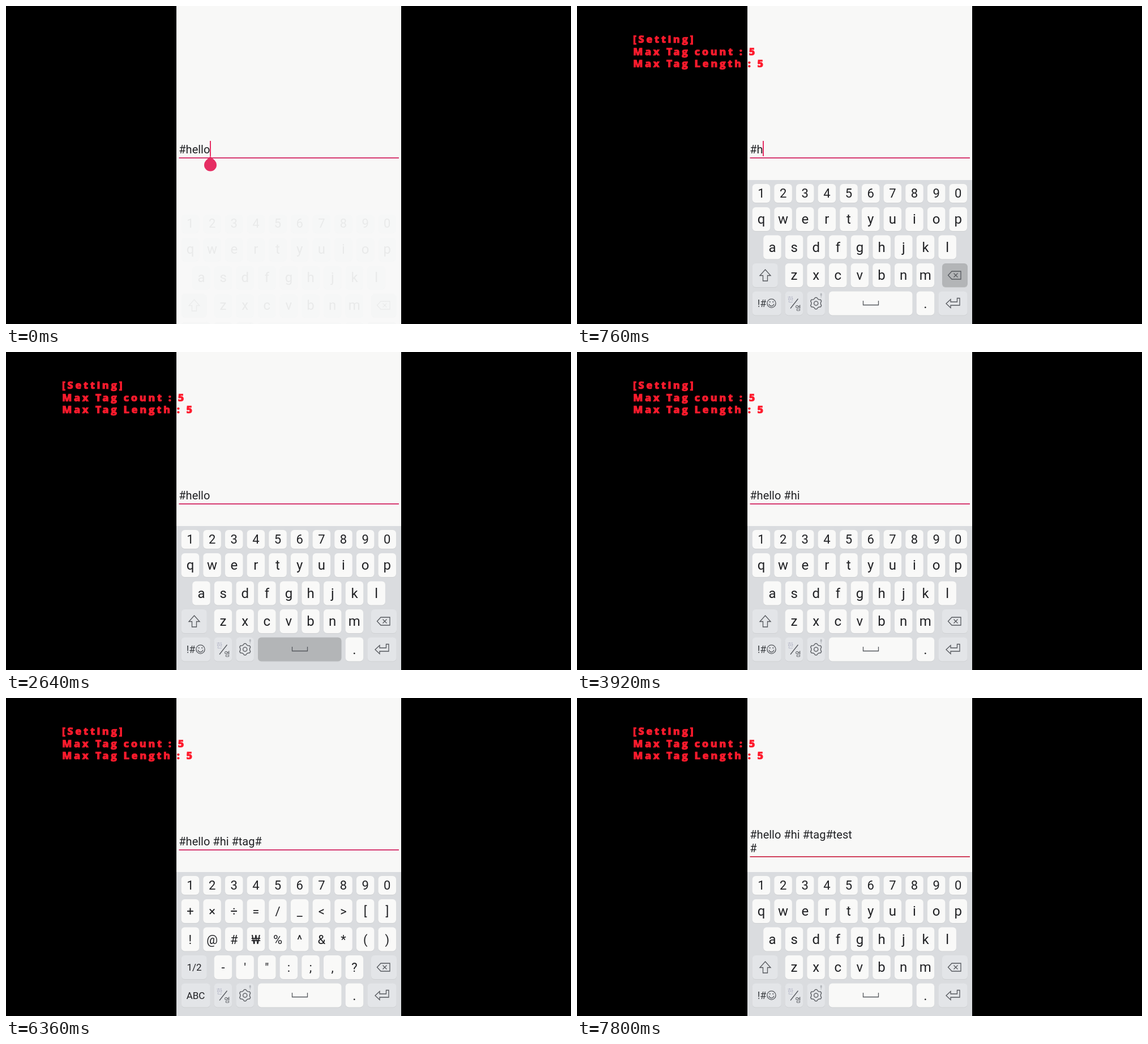
Recreate the animation shown at these times as an HTML page with a canvas. Size 998 by 561 pixels, loop 8000 ms.

```html
<!DOCTYPE html>
<html lang="en">
<head>
<meta charset="utf-8">
<title>Tag input</title>
<style>
  html, body { margin: 0; width: 100%; height: 100%; overflow: hidden; background: #000; }
  canvas { display: block; width: 998px; height: 561px; }
</style>
</head>
<body>
<canvas id="stage" width="998" height="561"></canvas>
<script>
const ctx = document.getElementById('stage').getContext('2d');
const LOOP = 8000, BLINK = 240;
const PAPER = '#f8f8f7', KEY = '#f9f9f8', PINK = '#e62e63', INK = '#202124', ICON = '#55585d';
const ROBOTO = 'Roboto, sans-serif';
const clamp = v => Math.max(0, Math.min(1, v));

// Key presses: [key, down, up, text added]
const presses = [
  ...[400, 520, 640, 760, 880].map(t => ['back', t, t + 80, '']),
  ['h', 1640, 1720, 'h'], ['e', 1800, 1880, 'e'], ['l', 1920, 2000, 'l'],
  ['l', 2040, 2120, 'l'], ['o', 2160, 2240, 'o'], ['space', 2640, 2720, ' #'],
  ['h', 3480, 3560, 'h'], ['i', 3600, 3680, 'i'], ['space', 4040, 4120, ' #'],
  ['t', 4600, 4680, 't'], ['a', 4740, 4820, 'a'], ['g', 4880, 4960, 'g'],
  ['mode', 5640, 5720, ''], ['#', 6080, 6120, '#'], ['mode', 6520, 6600, ''],
  ['t', 6840, 6920, 't'], ['e', 6960, 7040, 'e'], ['s', 7060, 7140, 's'],
  ['t', 7200, 7280, 't'], ['enter', 7520, 7560, '\n#']
];

// Key layouts
const PITCH = 38.65;
const row = (chars, x, y, h, size) => [...chars].map((id, i) =>
  ({ id, x: x + i * PITCH, y, w: 31.5, h, size, label: id }));
const special = (id, x, y, w) => ({ id, x, y, w, h: 42, gray: id !== 'space' });
const common = [
  ...row('1234567890', 309.7, 314, 33, 22),
  special('back', 645, 454, 45), special('mode', 309.7, 503.5, 51),
  special('lang', 367.7, 503.5, 31.5), special('gear', 406.4, 503.5, 31.5),
  special('space', 445, 503.5, 147.5), special('enter', 638.6, 503.5, 51),
  ...row('.', 599.7, 503.5, 42, 24), special('shift', 309.7, 454, 45)
];
const letters = [...common,
  ...row('qwertyuiop', 309.7, 355, 42, 24),
  ...row('asdfghjkl', 329.2, 404.5, 42, 24),
  ...row('zxcvbnm', 367.7, 454, 42, 24)];
const symbols = [...common,
  ...row('+×÷=/_<>[]', 309.7, 355, 42, 22),
  ...row('!@#₩%^&*()', 309.7, 404.5, 42, 22),
  ...row('-\'":;,?', 367.7, 454, 42, 22)];

function stateAt(t) {
  const s = { text: '#hello', last: -100, symbols: false, pressed: null, handle: true };
  for (const [id, down, up, add] of presses) {
    const at = id === 'back' ? down : up;
    if (t >= down && t < up) s.pressed = id;
    if (t < at) continue;
    if (id === 'mode') { s.symbols = !s.symbols; continue; }
    s.text = id === 'back' ? s.text.slice(0, -1) : s.text + add;
    s.last = at;
    s.handle = false;
  }
  s.cursor = Math.floor((t - s.last) / BLINK) % 2 === 0;
  return s;
}

function label(str, x, y, size, color = INK, align = 'center', font = ROBOTO) {
  ctx.font = `${size}px ${font}`;
  ctx.fillStyle = color;
  ctx.textAlign = align;
  ctx.fillText(str, x, y);
}

function box(x, y, w, h, r, color) {
  ctx.fillStyle = color;
  ctx.beginPath();
  ctx.roundRect(x, y, w, h, r);
  ctx.fill();
}

function line(points, closed) {
  ctx.beginPath();
  for (let i = 0; i < points.length; i += 2) ctx.lineTo(points[i], points[i + 1]);
  if (closed) ctx.closePath();
  ctx.stroke();
}

function ring(x, y, r, from = 0, to = Math.PI * 2) {
  ctx.beginPath();
  ctx.arc(x, y, r, from, to);
  ctx.stroke();
}

function dot(x, y, r) {
  ctx.beginPath();
  ctx.arc(x, y, r, 0, Math.PI * 2);
  ctx.fill();
}

const icons = {
  shift() {
    line([332.5, 465, 342, 475.5, 336.5, 475.5, 336.5, 485, 328.5, 485, 328.5, 475.5, 323, 475.5], true);
  },
  back() {
    line([655.5, 475, 662, 468, 678, 468, 678, 482, 662, 482], true);
    line([665.5, 471.5, 672.5, 478.5]);
    line([672.5, 471.5, 665.5, 478.5]);
  },
  mode(sym) {
    if (sym) return label('ABC', 335, 531, 17);
    label('!#', 326.5, 531, 18, '#3c3f43');
    ring(343.5, 524.5, 7.6);
    ring(343.5, 525, 4.3, 0.15, Math.PI - 0.15);
    ctx.fillStyle = ICON;
    dot(340.7, 522, 1.1);
    dot(346.3, 522, 1.1);
  },
  lang() {
    const kr = '"Noto Sans CJK KR", "Noto Sans CJK", sans-serif';
    label('한', 377, 521.5, 11.5, '#b3b5c6', 'center', kr);
    label('영', 390.5, 536.5, 11, '#4a4d52', 'center', kr);
    line([377, 533.5, 390.5, 516.5]);
  },
  gear() {
    ctx.beginPath();
    for (let i = 0; i < 24; i++) {
      const a = (i - 0.5) * Math.PI / 12, r = i % 4 < 2 ? 10.3 : 8.3;
      ctx.lineTo(422.2 + r * Math.sin(a), 524.5 - r * Math.cos(a));
    }
    ctx.closePath();
    ctx.stroke();
    ring(422.2, 524.5, 3.6);
    box(429.7, 506.5, 3, 5, 1.5, '#b4b7bc');
    ctx.fillRect(430.7, 511.5, 1, 3);
  },
  space() { line([505.5, 520, 505.5, 527.5, 532.5, 527.5, 532.5, 520]); },
  enter() {
    line([652, 525, 660, 517.5, 660, 522, 671.5, 522, 671.5, 515.5, 676, 515.5,
      676, 528, 660, 528, 660, 532.5], true);
  }
};

function drawKey(k, s) {
  const down = s.pressed === k.id;
  box(k.x, k.y + 1, k.w, k.h, 6, '#cfd1d3');
  box(k.x, k.y, k.w, k.h, 6, down ? '#b3b5b7' : k.gray ? '#e3e5e8' : KEY);
  if (k.label) {
    label(k.label, k.x + k.w / 2, k.y + k.h / 2 + (k.h < 40 ? 7.6 : 8.2), k.size);
  } else if (k.id === 'shift' && s.symbols) {
    label('1/2', 332.5, 481, 17);
  } else {
    ctx.strokeStyle = ICON;
    ctx.lineWidth = 1.3;
    icons[k.id](s.symbols);
  }
}

function drawPopup(k) {
  const cx = k.x + k.w / 2, y = k.y - 89.5;
  ctx.save();
  ctx.shadowColor = 'rgba(60,64,70,.3)';
  ctx.shadowBlur = 4;
  ctx.shadowOffsetY = 1;
  box(cx - 29, y, 58, 73, 10, KEY);
  ctx.restore();
  label(k.label, cx, y + 53.5, 44, '#2e3033');
}

function drawKeyboard(t, s) {
  const p = clamp((t - 20) / 140), keys = s.symbols ? symbols : letters;
  ctx.save();
  ctx.globalAlpha = 0.06 + 0.94 * p;
  ctx.translate(0, 53 * (1 - p) ** 2);
  ctx.fillStyle = p ? '#dadcdf' : PAPER;
  ctx.fillRect(301, 307, 397, 254);
  keys.forEach(k => drawKey(k, s));
  const hit = keys.find(k => k.label && k.id === s.pressed);
  if (hit) drawPopup(hit);
  ctx.restore();
}

function drawField(s) {
  const lines = s.text.split('\n'), two = lines.length > 1;
  const base = two ? 248 : 259.5;
  lines.forEach((str, i) => label(str, 305.3, base + i * 23.5, 20, INK, 'left'));
  const end = 305.3 + ctx.measureText(lines[lines.length - 1]).width;
  ctx.fillStyle = two ? '#d0405c' : '#d63a70';
  ctx.fillRect(305.5, two ? 279 : 267, 388.5, 2);
  ctx.fillStyle = PINK;
  if (s.cursor) ctx.fillRect(Math.round(end - 0.3), two ? 250 : 238, 2, 27);
  if (s.handle) {
    dot(361, 280.5, 11);
    ctx.beginPath();
    ctx.moveTo(361, 265);
    ctx.lineTo(368.8, 272.7);
    ctx.lineTo(353.2, 272.7);
    ctx.fill();
  }
}

function drawTitle(t) {
  const a = clamp((t - 20) / 450);
  // The caption fades in linear light, so it looks stronger over black
  for (const [x, w, alpha] of [[0, 301, a ** 0.4545], [301, 397, a]]) {
    ctx.save();
    ctx.beginPath();
    ctx.rect(x, 0, w, 200);
    ctx.clip();
    ctx.globalAlpha = alpha;
    ctx.letterSpacing = '3.5px';
    ctx.font = '800 18px "Open Sans", Lato, sans-serif';
    ctx.textAlign = 'left';
    ctx.fillStyle = ctx.strokeStyle = '#ff1b2d';
    ctx.lineWidth = 0.7;
    ['[Setting]', 'Max Tag count : 5', 'Max Tag Length : 5'].forEach((str, i) => {
      ctx.fillText(str, 99, 65 + i * 21.5);
      ctx.strokeText(str, 99, 65 + i * 21.5);
    });
    ctx.restore();
  }
}

function draw(t) {
  const s = stateAt(t);
  ctx.fillStyle = '#000';
  ctx.fillRect(0, 0, 998, 561);
  ctx.fillStyle = PAPER;
  ctx.fillRect(301, 0, 397, 561);
  drawField(s);
  drawKeyboard(t, s);
  drawTitle(t);
}

const start = performance.now();
function tick() {
  draw((performance.now() - start) % LOOP);
  requestAnimationFrame(tick);
}
tick();
</script>
</body>
</html>
```
